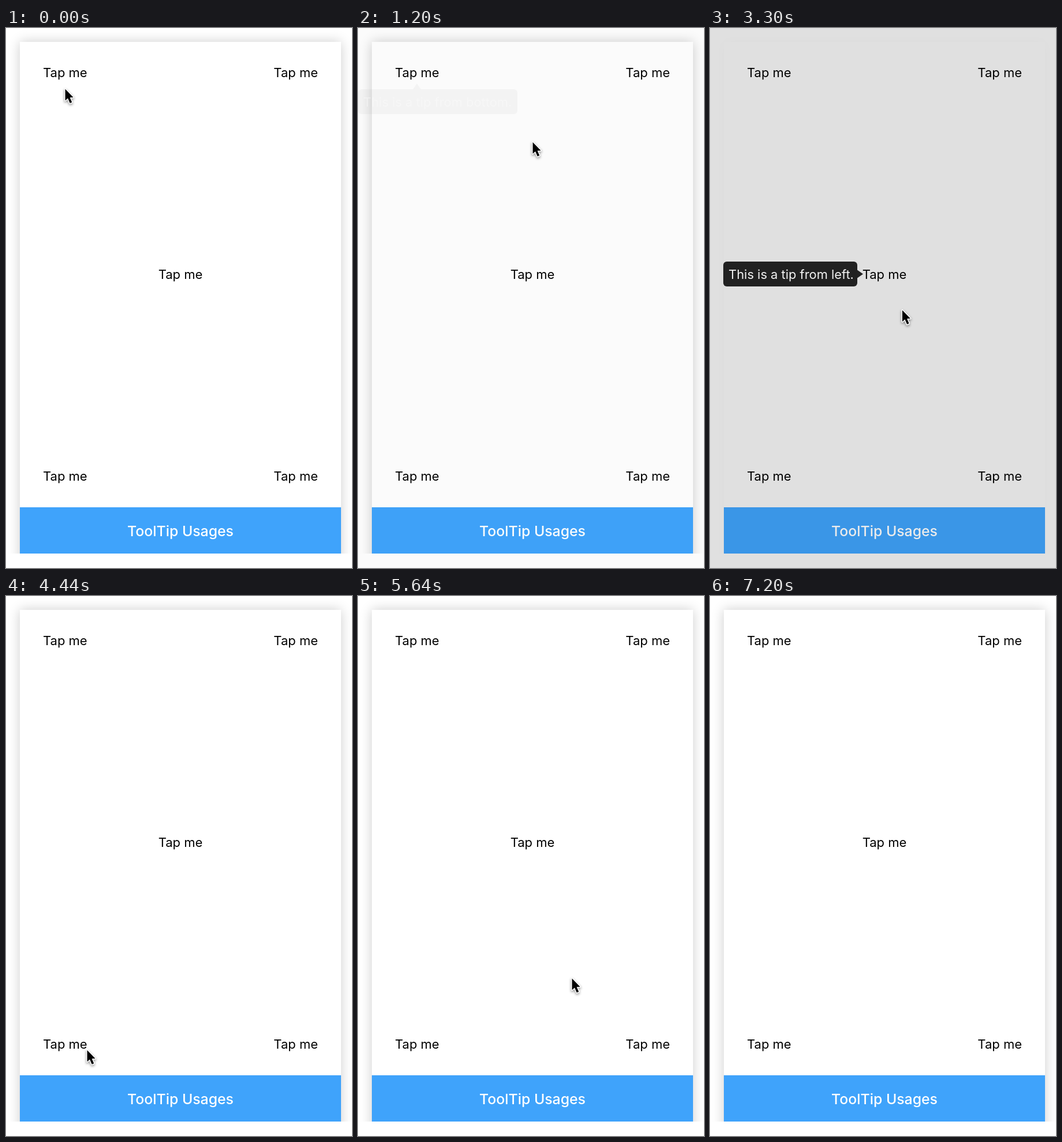
An HTML page with a canvas that plays this animation: 599x934 px, repeating every 7380 ms.

```html
<!DOCTYPE html>
<html lang="en">
<head>
<meta charset="utf-8">
<title>ToolTip Usages</title>
<style>
html, body { margin: 0; width: 100%; height: 100%; overflow: hidden; background: #fff; }
canvas { display: block; }
</style>
</head>
<body>
<canvas id="stage" width="599" height="934"></canvas>
<script>
const ctx = document.getElementById('stage').getContext('2d');
const W = 599, H = 934, LOOP = 7380, STEP = 60;
const FADE = 200, OPEN_DELAY = 120, CLOSE_DELAY = 60, DWELL = 300;
const FONT = 'Inter, "Noto Sans", sans-serif';
const BLUE = '#3fa3fb', DARK = 'rgba(0,0,0,0.85)';
const CARD = { x: 24, y: 24, w: 556, bottom: 909, bar: 80 };
const PAD = 9, LINE = 27.5;

const clamp = v => Math.max(0, Math.min(1, v));
const ease = v => v * v * (3 - 2 * v);

// Side of the label in its grid; pointer stops as time, x, y for opening and closing its tip.
const visits = [
  { side: [-1, -1], tap: [300, 104, 80], leave: [966, 302, 197],
    tip: a => bubbleTip(0, 106, 276, a, DARK, ['This is a tip from bottom.'], [0, -1]) },
  { side: [1, -1], tap: [1440, 480, 80], leave: [2100, 350, 231],
    tip: a => bubbleTip(368, 6, 236, a, DARK, ['This is a tip from top.'], [0, 1]) },
  { side: [0, 0], tap: [2820, 300, 428], leave: [3420, 350, 520],
    tip: a => bubbleTip(23, 404, 232, a, DARK, ['This is a tip from left.'], [1, 0]) },
  { side: [-1, 1], tap: [4440, 140, 785], leave: [5340, 370, 661],
    tip: a => bubbleTip(0, 803, 559, a, '#bf6d34',
      ['Without caret is ok, too.', 'You can also customize backgroundColor for tooltip.']) },
  { side: [1, 1], tap: [5880, 478, 773], leave: [6600, 420, 842], tip: popup }
];
for (const v of visits) {
  v.x = 302 + 199.7 * v.side[0];
  v.y = 426 + 349 * v.side[1];
  v.open = v.tap[0] + OPEN_DELAY;
  v.close = v.leave[0] + CLOSE_DELAY;
}
const stops = [[-DWELL, 102, 105], ...visits.flatMap(v => [v.tap, v.leave]), [7140, 131, 918]];

function shown(t, { open, close }) {
  return clamp((t - open) / FADE) * (1 - clamp((t - close) / FADE));
}

function pressed(t, { open }) {
  return clamp((t - open) / 60 + 2) * (1 - clamp((t - open - 120) / 180));
}

function text(str, x, y, size, color, align = 'center', weight = 400) {
  ctx.font = `${weight} ${size}px ${FONT}`;
  ctx.textAlign = align;
  ctx.fillStyle = color;
  ctx.fillText(str, x, y + size * 0.364);
}

function bubble(x, y, w, h, color) {
  ctx.fillStyle = color;
  ctx.beginPath();
  ctx.roundRect(x, y, w, h, 6);
  ctx.fill();
}

// Triangle pointing along (dx, dy), with its base centred on x, y.
function caret(x, y, [dx, dy]) {
  ctx.beginPath();
  ctx.moveTo(x - 7 * dy, y - 7 * dx);
  ctx.lineTo(x + 10 * dx, y + 10 * dy);
  ctx.lineTo(x + 7 * dy, y + 7 * dx);
  ctx.fill();
}

function bubbleTip(x, y, w, a, color, lines, dir) {
  const h = 43 + (lines.length - 1) * LINE;
  ctx.globalAlpha = a ** 1.6;
  bubble(x, y, w, h, color);
  if (dir) {
    const [dx, dy] = dir;
    const baseX = dx ? x + w : (dy < 0 ? 102 : 502);
    caret(baseX, y + h * (1 + dy) / 2, dir);
  }
  ctx.globalAlpha = Math.sqrt(a);
  const ink = a < 1 ? '#fff' : '#f2f2f2';
  lines.forEach((line, i) => text(line, x + PAD, y + 21.7 + i * LINE, 21.9, ink, 'left'));
  ctx.globalAlpha = 1;
}

function popup(a) {
  ctx.globalAlpha = clamp(a * 1.7);
  bubble(85, 512, 519, 234, '#fff');
  caret(502, 746, [0, 1]);
  ctx.globalAlpha = a ** 1.6;
  text('Customized Popup Content', 344.5, 549, 22.4, '#000', 'center', 700);
  ctx.strokeStyle = BLUE;
  ctx.lineWidth = 2;
  for (let row = 0; row < 3; row++) {
    for (let col = 0; col < 3; col++) {
      const x = 181 + col * 162.5, y = 598 + row * 53;
      const label = `row: ${row + 1} col: ${col + 1}`;
      text(label, x, y, 22.2, BLUE);
      const w = ctx.measureText(label).width + 20;
      ctx.beginPath();
      ctx.roundRect(x - w / 2, y - 18, w, 36, 5);
      ctx.stroke();
    }
  }
  ctx.globalAlpha = 1;
}

function card(dim) {
  ctx.fillStyle = '#fff';
  ctx.fillRect(0, 0, W, H);
  ctx.save();
  ctx.beginPath();
  ctx.rect(0, 0, W, CARD.bottom);
  ctx.clip();
  ctx.shadowColor = `rgba(0,0,0,${0.2 * (1 - 0.9 * dim ** 3)})`;
  ctx.shadowBlur = 20;
  ctx.fillRect(CARD.x, CARD.y, CARD.w, H);
  ctx.restore();
  ctx.fillStyle = `rgba(0,0,0,${0.122 * dim})`;
  ctx.fillRect(0, 0, W, H);
}

function banner(dim) {
  const bar = [CARD.x, CARD.bottom - CARD.bar, CARD.w, CARD.bar];
  ctx.fillStyle = BLUE;
  ctx.fillRect(...bar);
  text('ToolTip Usages', 302, 869.5, 24.8, '#fff', 'center', 500);
  ctx.fillStyle = `rgba(0,0,0,${0.08 * dim})`;
  ctx.fillRect(...bar);
}

function pointer(t) {
  const next = stops.findIndex(s => s[0] >= t);
  if (next < 0) return;
  const [t1, x1, y1] = stops[next];
  const [t0, x0, y0] = stops[next - 1];
  const k = ease(clamp((t - t0 - DWELL) / (t1 - t0 - DWELL)));
  ctx.save();
  ctx.translate(x0 + (x1 - x0) * k, y0 + (y1 - y0) * k);
  const arrow = new Path2D('M.5 .5V20.5L5 16.5 8.7 25 12.2 23.5 8.6 15.2 14.6 15Z');
  ctx.lineJoin = 'round';
  ctx.lineWidth = 3;
  ctx.strokeStyle = '#fff';
  ctx.shadowColor = 'rgba(0,0,0,0.45)';
  ctx.shadowBlur = 4;
  ctx.shadowOffsetY = 2;
  ctx.stroke(arrow);
  ctx.shadowColor = 'transparent';
  ctx.fillStyle = '#000';
  ctx.fill(arrow);
  ctx.restore();
}

function draw(t) {
  const levels = visits.map(v => shown(t, v));
  const dim = Math.max(...levels);
  card(dim);
  for (const v of visits) {
    ctx.globalAlpha = 1 - 0.62 * pressed(t, v);
    text('Tap me', v.x, v.y, 22, '#000');
  }
  ctx.globalAlpha = 1;
  banner(dim);
  visits.forEach((v, i) => { if (levels[i] > 0) v.tip(levels[i]); });
  pointer(t);
}

const start = performance.now();
function tick() {
  const t = (performance.now() - start) % LOOP;
  draw(Math.floor(t / STEP) * STEP);
  requestAnimationFrame(tick);
}
tick();
</script>
</body>
</html>
```
